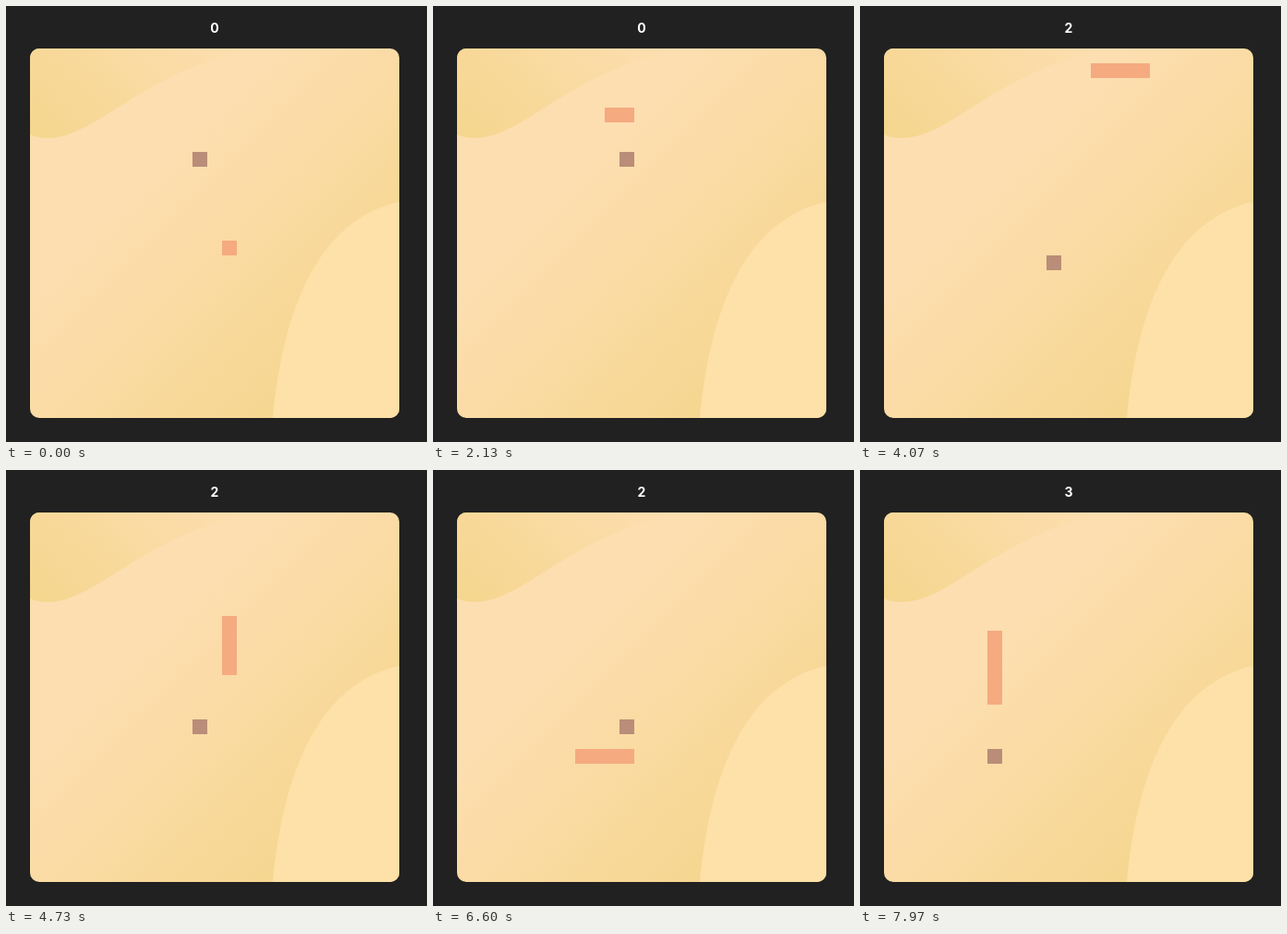
Recreate the animation shown at these times as an HTML page. Size 456x472 px, loop 8 s.

```html
<!DOCTYPE html>
<html lang="en">
<head>
<meta charset="utf-8">
<title>Snake</title>
<style>
  html, body { margin: 0; width: 100%; height: 100%; overflow: hidden; background: #212121; }
  svg { display: block; }
  text { font: bold 14px Inter, Arial, sans-serif; fill: #fff; text-anchor: middle; }
</style>
</head>
<body>
<svg width="456" height="472">
  <defs>
    <linearGradient id="shade">
      <stop stop-color="#fddeb0"/>
      <stop offset="1" stop-color="#f5d68e"/>
    </linearGradient>
    <linearGradient id="bandShade" href="#shade" gradientUnits="userSpaceOnUse" x1="160" y1="180" x2="370" y2="390"/>
    <linearGradient id="hillShade" href="#shade" gradientUnits="userSpaceOnUse" x1="200" y1="-10" x2="40" y2="150"/>
    <clipPath id="board"><rect x="26" y="46" width="400" height="400" rx="10"/></clipPath>
  </defs>
  <g clip-path="url(#board)">
    <rect x="26" y="46" width="400" height="400" fill="url(#bandShade)"/>
    <path d="M26 46H276C150 66 100 143 45 143Q34 143 26 139Z" fill="url(#hillShade)"/>
    <path d="M289 446C299 335 335 232 426 212V446Z" fill="#fee1a8"/>
  </g>
  <g transform="translate(26 46) scale(16)" shape-rendering="crispEdges">
    <rect id="food" width="1" height="1" fill="#b98d78"/>
    <path id="snake" fill="#f5aa80"/>
  </g>
  <text id="score" x="226" y="29"></text>
</svg>
<script>
const LOOP = 8000, PACE = 68;
const $ = id => document.getElementById(id);

// Each run starts at a time in ms and then moves one cell per PACE.
const runs = {
  1370: 'U9 L3', 2270: 'D3 R10', 3230: 'U6 L6', 4100: 'L1 D12 L6',
  5570: 'L4 D3 R8', 6700: 'U9 L4', 7670: 'D5'
};
const foods = [[11, 7], [20, 4], [11, 14], [7, 16]];
const moves = { U: [0, -1], D: [0, 1], L: [-1, 0], R: [1, 0] };

const steps = [{ x: 13, y: 13, time: 0, score: 0 }];
for (const [start, run] of Object.entries(runs)) {
  let time = Number(start);
  for (const leg of run.split(' ')) {
    const [dx, dy] = moves[leg[0]];
    for (let n = Number(leg.slice(1)); n > 0; n--, time += PACE) {
      const last = steps.at(-1), x = last.x + dx, y = last.y + dy;
      const [foodX, foodY] = foods[last.score];
      const eats = x === foodX && y === foodY;
      steps.push({ x, y, time, score: last.score + (eats ? 1 : 0) });
    }
  }
}

function draw(now) {
  const time = now % LOOP;
  const past = steps.filter(step => step.time <= time);
  const { score } = past.at(-1);
  const [foodX, foodY] = foods[score];
  $('food').setAttribute('x', foodX);
  $('food').setAttribute('y', foodY);
  const body = past.slice(-score - 2);
  $('snake').setAttribute('d', body.map(({ x, y }) => `M${x} ${y}h1v1h-1z`).join(''));
  $('score').textContent = score;
}

const start = performance.now();
function frame() {
  draw(performance.now() - start);
  requestAnimationFrame(frame);
}
frame();
</script>
</body>
</html>
```
